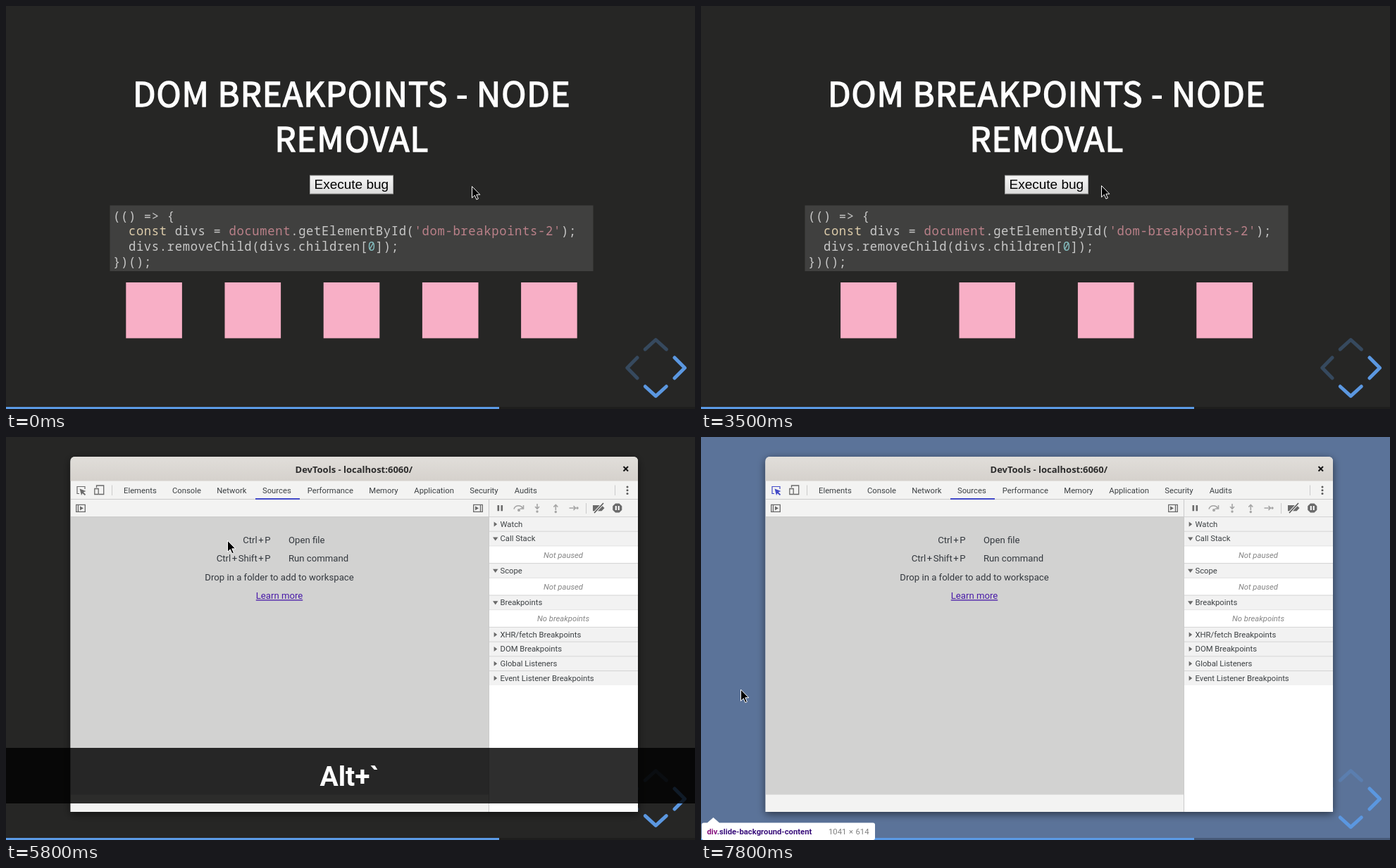
Recreate the animation shown at these times as an HTML page. Size 978 by 573 pixels, loop 8000 ms.

```html
<!DOCTYPE html>
<html lang="en">
<head>
<meta charset="utf-8">
<title>DOM breakpoints</title>
<style>
  html, body { margin: 0; width: 100%; height: 100%; overflow: hidden; background: #262625; }
  svg { display: block; width: 978px; height: 573px; }
  text { white-space: pre; }
  .title { font: 400 47.3px "Noto Sans CJK JP", "Noto Sans CJK SC", "Noto Sans", sans-serif;
           letter-spacing: 1px; fill: #fff; stroke: #fff; stroke-width: 1.4px; text-anchor: middle; }
  .button { font: 19px "Liberation Sans", Arial, sans-serif; text-anchor: middle; }
  .code { font: 17.2px "Noto Sans Mono", monospace; letter-spacing: .65px; fill: #c8c8c8; }
  .key { fill: #dccbaa; }
  .str { fill: #ba8089; }
  .num { fill: #86c0c2; }
  .arrows { fill: none; stroke: #5b97e0; stroke-width: 5; stroke-linecap: round; stroke-linejoin: round; }
  .caption { font: 700 13px "Noto Sans", sans-serif; text-anchor: middle; }
  .ui { font: 11.27px Roboto, sans-serif; fill: #3c4043; }
  .help { font: 13.15px Roboto, sans-serif; fill: #33383e; }
  .combo { text-anchor: end; word-spacing: -1.75px; }
  .mid { text-anchor: middle; }
  .empty { font-style: italic; fill: #858585; text-anchor: middle; }
  .keys { font: 700 39px Roboto, sans-serif; fill: #fff; text-anchor: middle; }
  .icon { fill: none; stroke: #6a6a6a; stroke-width: 1.3; }
  .solid { fill: #6a6a6a; }
  .pale { fill: none; stroke: #a5a5a5; stroke-width: 1.6; }
</style>
</head>
<body>
<svg viewBox="0 0 978 573">
  <defs>
    <linearGradient id="face" x2="0" y2="1"><stop id="faceTop"/><stop id="faceEnd" offset="1"/></linearGradient>
    <linearGradient id="bar" x2="0" y2="1"><stop stop-color="#e1deda"/><stop offset="1" stop-color="#d5d1cc"/></linearGradient>
    <filter id="shadow" x="-10%" y="-10%" width="120%" height="120%">
      <feDropShadow dx="0" dy="3" stdDeviation="6" flood-color="#000" flood-opacity=".55"/>
    </filter>
  </defs>

  <rect id="page" width="978" height="573"/>
  <g id="slide">
    <text class="title" x="490.8" y="143">DOM BREAKPOINTS - NODE</text>
    <text class="title" x="490.8" y="206.8">REMOVAL</text>
    <rect id="button" x="431.5" y="241" width="118" height="26" fill="url(#face)"/>
    <text class="button" x="490.3" y="260">Execute bug</text>
    <rect x="147.5" y="283.5" width="686" height="93.5" fill="#40403f"/>
    <g class="code">
      <text x="152" y="304.8">(() =&gt; {</text>
      <text x="152" y="326.4">  <tspan class="key">const</tspan> divs = <tspan class="str">document</tspan>.getElementById(<tspan class="str">'dom-breakpoints-2'</tspan>);</text>
      <text x="152" y="348">  divs.removeChild(divs.children[<tspan class="num">0</tspan>]);</text>
      <text x="152" y="369.6">})();</text>
    </g>
    <g id="boxes" fill="#f8afc6"></g>
  </g>

  <g class="arrows">
    <path opacity=".3" d="M907.3 488.2 922.3 474.5 937.3 488.2M896 500 881.8 514.5 896 529"/>
    <path d="M949 500 963.5 514.5 949 529"/>
    <path id="down" d="M907.3 541 922.3 554.6 937.3 541"/>
  </g>
  <rect y="570" width="978" height="3" opacity=".22"/>
  <rect y="570" width="700" height="3" fill="#5b9ae5"/>

  <g id="tools">
    <path filter="url(#shadow)" fill="#f3f3f2" d="M91.5 533V35q0-7 7-7H890q7 0 7 7V533z"/>
    <path id="activeBar" fill="url(#bar)" d="M91.5 62.5V35q0-7 7-7H890q7 0 7 7V62.5z"/>
    <text id="caption" class="caption" x="493.8" y="50.5">DevTools - localhost:6060/</text>
    <path id="close" fill="none" stroke-width="2" d="M876.5 42l6.5 6.5m0-6.5-6.5 6.5"/>
    <path fill="#d2d2d1" d="M92 113.5H685V508.5H92z"/>
    <path fill="#fff" d="M686 113.5H897V533H686z"/>
    <path fill="none" stroke="#cbcbcb" d="M92 88.5H897M92 113.5H897M685.5 88.5V533M150.5 68.5V83M864.5 68.5V83M823.5 94V109"/>
    <path fill="#434ac8" d="M354 87h63v2h-63z"/>
    <g id="tabs" class="ui"></g>
    <g id="panels" class="ui"></g>

    <g id="inspect" stroke-width="1.2">
      <path fill="none" d="M104 80.5H101V70.5H112V74"/>
      <path stroke="none" d="M104.5 73.5l9 3.6-3.6 1.5 3.3 3.2-1.4 1.3-3.3-3.2-1.5 3.2z"/>
    </g>
    <path class="icon" d="M128.5 72V69H138.7V81.5H132M125.8 73.5h5.4v8h-5.4z"/>
    <path class="icon" d="M99.7 96.3h12.6v10H99.7zM102.5 96v10.5M663.7 96.3h12.6v10H663.7zM673.5 96v10.5"/>
    <path class="solid" d="M105 98.3l5 3-5 3zM666 98.3l5 3-5 3zM697.5 97h2.6v8.3h-2.6zM702.5 97h2.6v8.3h-2.6z"/>
    <path class="pale" d="M721 102.5a6.7 6.2 0 0 1 12.4-1.5M734.5 97v5h-5M754 95v6m-3-2 3 3 3-3M780.3 104v-7.5m-3 3 3-3 3 3M799.5 101h9m-3-3 3 3-3 3"/>
    <g fill="#a5a5a5"><circle cx="728" cy="104" r="2"/><circle cx="754" cy="106" r="1.7"/><circle cx="780.3" cy="106.5" r="1.7"/><circle cx="811" cy="101" r="1.7"/></g>
    <path class="solid" d="M833 97h12.5l4 4-4 4.3H833z"/>
    <path stroke="#f3f3f2" stroke-width="3.5" d="M835 108 848 94"/>
    <path stroke="#555" stroke-width="1.5" d="M835 108 848 94"/>
    <path class="solid" d="M865 94.5h5.5l3.8 3.8v5.4l-3.8 3.8H865l-3.8-3.8v-5.4z"/>
    <path fill="#fff" d="M864.8 98h2v6h-2zM868.7 98h2v6h-2z"/>
    <g fill="#5a5a5a"><circle cx="882" cy="71" r="1.5"/><circle cx="882" cy="75.7" r="1.5"/><circle cx="882" cy="80.4" r="1.5"/></g>

    <text class="help combo" x="375.5" y="151">Ctrl + P</text>
    <text class="help" x="401" y="151">Open file</text>
    <text class="help combo" x="375.5" y="177.4">Ctrl + Shift + P</text>
    <text class="help" x="401" y="177.4">Run command</text>
    <text class="help mid" x="388" y="203.8">Drop in a folder to add to workspace</text>
    <text class="help mid" x="388" y="230.3" style="fill:#481aa8;text-decoration:underline">Learn more</text>
  </g>

  <g id="keys">
    <rect y="442" width="978" height="79" opacity=".82"/>
    <text class="keys" x="487.5" y="496">Alt+`</text>
  </g>

  <g id="tip">
    <path fill="#fff" d="M4 548.5H9L17.5 541 26 548.5H244q3 0 3 3V570q0 3-3 3H4q-3 0-3-3V551.5q0-3 3-3z"/>
    <text class="ui" x="8.5" y="564.5" style="font-weight:700;fill:#3a107c"><tspan fill="#881280">div</tspan>.slide-background-content</text>
    <text class="ui" x="181" y="564.5" style="fill:#808080;word-spacing:.8px">1041 × 614</text>
  </g>

  <path id="cursor" fill="#000" stroke="#fff" d="M0 0V16.3L3.8 12.7 6.4 18.6 8.9 17.5 6.3 11.7H11.3z"/>
</svg>

<script>
const $ = id => document.getElementById(id);
const show = (id, on) => $(id).setAttribute('display', on ? 'inline' : 'none');
const set = (id, attrs) => { for (const k in attrs) $(id).setAttribute(k, attrs[k]); };

const tabs = { Elements: 167, Console: 236, Network: 299.3, Sources: 364, Performance: 427.7,
  Memory: 515.3, Application: 579.3, Security: 658.3, Audits: 721.7 };
$('tabs').innerHTML = Object.entries(tabs).map(([name, x]) => `<text x="${x}" y="79.5">${name}</text>`).join('');

// Sidebar sections: a header, and a note below it when open
const sections = [['Watch'], ['Call Stack', 'Not paused'], ['Scope', 'Not paused'], ['Breakpoints', 'No breakpoints'],
  ['XHR/fetch Breakpoints'], ['DOM Breakpoints'], ['Global Listeners'], ['Event Listener Breakpoints']];

function sidebar() {
  let y = 113.5, rows = '';
  for (const [name, note] of sections) {
    const mid = y + 10.2;
    rows += `<path fill="#f2f2f2" d="M686 ${y}H897v20.6H686z"/><path stroke="#d4d4d4" d="M686 ${y}H897"/>
      <path class="solid" d="${note ? `M691 ${mid - 2}h7.4l-3.7 5.2z` : `M692.6 ${mid - 3.2}v7l4.6-3.5z`}"/>
      <text x="701.5" y="${mid + 4}">${name}</text>`;
    y += 20.7;
    if (note) {
      rows += `<path stroke="#e2e2e2" d="M686 ${y}H897"/><text class="empty" x="791" y="${y + 16.7}">${note}</text>`;
      y += 24.7;
    }
  }
  return rows;
}
$('panels').innerHTML = sidebar();

const smooth = p => p * p * (3 - 2 * p);
const easeOut = p => 1 - (1 - p) ** 2.3;

// Keys are [time, ...values]
function track(keys, t, ease) {
  const i = keys.findIndex(k => k[0] > t);
  if (i < 0) return keys[keys.length - 1].slice(1);
  const a = keys[i - 1], b = keys[i], p = ease((t - a[0]) / (b[0] - a[0]));
  return a.slice(1).map((v, j) => v + (b[j + 1] - v) * p);
}

const pointer = [[0, 661.5, 256.5], [200, 661.5, 256.5], [1100, 544.5, 264], [1400, 536.5, 264.3],
  [1700, 536.5, 264.3], [1900, 534.5, 264.3], [3400, 534.5, 264.3], [3500, 568.5, 255.5], [3700, 568.5, 255.5],
  [3900, 578, 255], [5300, 578, 255], [6200, 126, 70], [6600, 105.5, 73], [6900, 105.5, 73],
  [7100, 103, 512], [7500, 78, 404], [7600, 78, 404], [7800, 56.5, 359]];
const bounce = [[0, 0], [200, 0], [400, 10], [500, 0], [600, -5], [800, 0], [2000, 0]];

// The page stalls while the tools window opens and covers it
function arrowShift(t) {
  if (t >= 7000) return 0;
  if (t >= 4800) return -2.3;
  return track(bounce, (Math.min(t, 4400) + 1875) % 2000, easeOut)[0];
}

function drawBoxes(count, pitch) {
  let out = '';
  for (let i = 0; i < count; i++)
    out += `<rect x="${450.7 + (i - (count - 1) / 2) * pitch}" y="393" width="79.6" height="79.4"/>`;
  $('boxes').innerHTML = out;
}

const grey = v => `rgb(${v},${v},${v})`;

function draw(t) {
  const open = t >= 4800, inspected = t >= 7700;
  const hover = t >= 1100 && t < 3500;
  const focus = Math.min(1, Math.max(0, (t - 4800) / 200));
  const [x, y] = track(pointer, t, smooth);
  const tint = t >= 6700 ? '#434ac8' : '#6a6a6a';

  set('page', { fill: inspected ? '#5b7399' : '#262625' });
  set('faceTop', { 'stop-color': hover ? '#fafafa' : '#f6f6f6' });
  set('faceEnd', { 'stop-color': hover ? '#e2e2e2' : '#dcdcdc' });
  set('button', { stroke: hover ? '#959595' : '#a4a4a4' });
  if (t < 2900) drawBoxes(5, 140.2); else drawBoxes(4, 168.4);
  set('down', { transform: `translate(0 ${arrowShift(t)})` });

  show('slide', !inspected);
  show('tools', open);
  show('keys', open && t < 7000);
  show('tip', inspected);
  set('activeBar', { opacity: focus });
  set('caption', { fill: grey(142 - 98 * focus) });
  set('close', { stroke: grey(140 - 120 * focus) });
  set('inspect', { fill: tint, stroke: tint });
  set('cursor', { transform: `translate(${x} ${y})` });
}

function tick() {
  draw(Math.floor(performance.now() % 8000 / 100 + 1e-6) * 100);
  requestAnimationFrame(tick);
}
tick();
</script>
</body>
</html>
```
